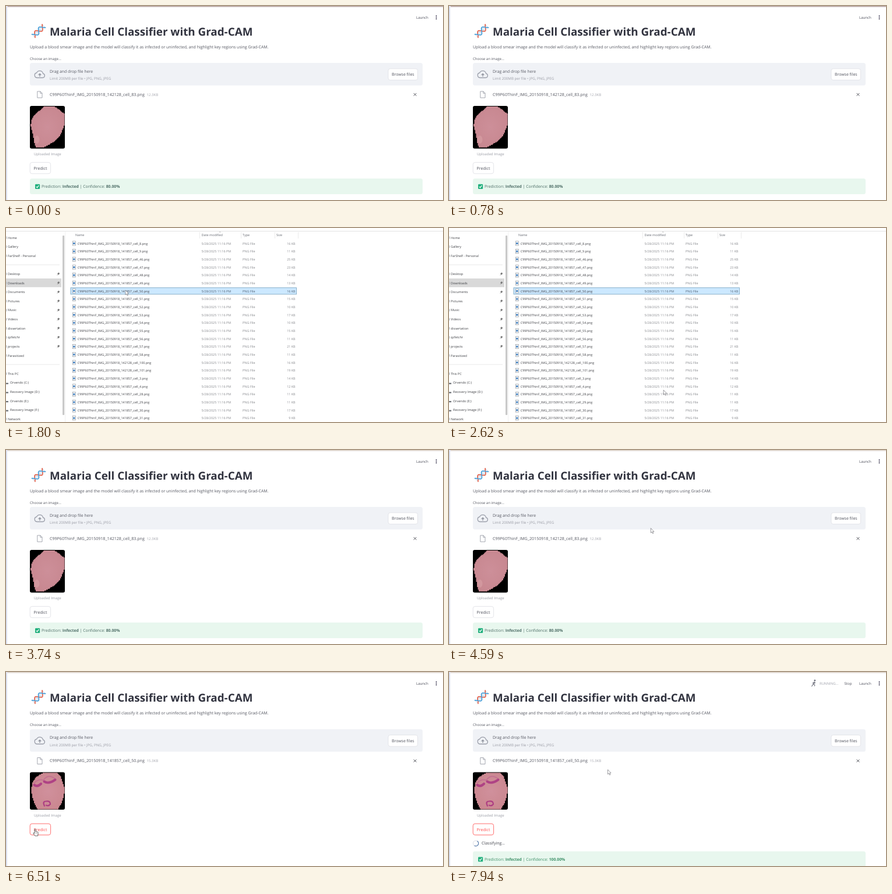
Animation, 750 px wide and 334 px high, one loop 7990 ms. Source, as an HTML page:

```html
<!DOCTYPE html>
<html lang="en">
<head>
<meta charset="utf-8">
<title>Malaria Cell Classifier</title>
<style>
  html, body { margin: 0; width: 100%; height: 100%; overflow: hidden; background: #fff; }
  svg { display: block; width: 750px; height: 334px; }
  text { font-family: "Open Sans", "Noto Sans", sans-serif; text-rendering: geometricPrecision; white-space: pre; }
</style>
</head>
<body>
<svg id="stage" viewBox="0 0 750 334" xmlns="http://www.w3.org/2000/svg"></svg>
<script>
const LOOP = 7990;
const INK = '#31333f', GREY = '#9a9ca5', RED = '#ff4b4b';

const text = (x, y, size, str, fill = INK, more = '') =>
  `<text x="${x}" y="${y}" font-size="${size}" fill="${fill}" ${more}>${str}</text>`;
const rect = (x, y, w, h, fill, more = '') =>
  `<rect x="${x}" y="${y}" width="${w}" height="${h}" fill="${fill}" ${more}/>`;
const path = (d, stroke, width = 1, more = '') =>
  `<path d="${d}" fill="none" stroke="${stroke}" stroke-width="${width}" ${more}/>`;
const shape = (d, fill, more = '') => `<path d="${d}" fill="${fill}" ${more}/>`;
const group = (id, content, more = '') => `<g id="${id}" ${more}>${content}</g>`;
const mix = (a, b, p) => a + (b - a) * p;

// ---- classifier page ----
function helix() {
  const wave = u => 4.2 * Math.sin(u * Math.PI / 9);
  const strand = side => {
    let d = '';
    for (let u = -13; u <= 13; u += 0.5) d += `${d ? 'L' : 'M'}${u} ${(side * wave(u)).toFixed(2)}`;
    return d;
  };
  let rungs = '';
  for (const u of [-12, -6, -4, -2.5, 2.5, 4, 6, 12]) rungs += `M${u} ${-wave(u)}V${wave(u)}`;
  return `<g transform="translate(56 43) rotate(-44)">${path(rungs, '#8fb4d4', 0.7)}
    ${path(strand(1), '#e4573f', 1.6)}${path(strand(-1), '#3f9bd8', 1.6)}</g>`;
}

// Blocky blob from a few [y, left, right] spans, snapped to a coarse grid.
function blob(spans, fill) {
  const STEP = 1.5, snap = v => Math.round(v / STEP) * STEP;
  let d = '';
  for (let y = spans[0][0]; y < spans[spans.length - 1][0]; y += STEP) {
    const i = spans.findIndex(span => span[0] > y);
    const [y0, l0, r0] = spans[i - 1], [y1, l1, r1] = spans[i];
    const p = (y - y0) / (y1 - y0);
    d += `M${snap(mix(l0, l1, p))} ${y}H${snap(mix(r0, r1, p))}V${y + STEP + 0.1}H${snap(mix(l0, l1, p))}Z`;
  }
  return shape(d, fill);
}

const plainCell = rect(41, 172, 60, 73.5, '#000', 'rx="3"') +
  blob([[173, 64, 84], [178, 59, 92], [185, 51, 100], [192, 45, 101], [205, 42, 100], [215, 45, 96],
    [225, 47, 91], [233, 48, 82], [240, 50, 70], [243.5, 53, 64]], 'url(#pink)') +
  '<ellipse cx="53" cy="230" rx="4.5" ry="7" fill="#dba6aa" opacity=".5"/>';

const stainedCell = rect(41, 172, 60, 64.5, '#000', 'rx="3"') +
  blob([[173, 63, 88], [179, 52, 94], [188, 46, 97], [201, 43, 101], [213, 45, 99], [225, 49, 95],
    [235.5, 54, 89]], 'url(#rose)') +
  `<g stroke-linecap="round">${path('M64 186Q72 174 84 183M49 190Q56 183 64 186', '#b8588f', 2, 'opacity=".45"')}
    ${path('M48.5 194Q54 198 60 192', '#a3237d', 4.2, 'opacity=".7"')}
    ${path('M65.5 188Q73 193 84.5 185', '#a3237d', 4, 'opacity=".7"')}
    ${path('M66 230Q62 222 69 222Q76 221 76 227Q73 231 69 229', '#a3237d', 2.2, 'opacity=".75"')}</g>`;

const heading = text(704, 21.6, 6.1, 'Launch', '#4a4c58') +
  [17, 19.6, 22.2].map(y => `<circle cx="738.5" cy="${y}" r=".95" fill="#3a3650"/>`).join('') +
  helix() +
  text(75, 50.5, 18.82, 'Malaria Cell Classifier with Grad-CAM', INK, 'font-weight="700"') +
  text(41, 73, 6.97, 'Upload a blood smear image and the model will classify it as infected or uninfected, and highlight key regions using Grad-CAM.', '#555761') +
  text(41, 92.6, 6.1, 'Choose an image...', '#555761');

const uploader = rect(41, 98, 674, 38.7, '#f0f2f6', 'rx="3.5"') +
  path('M53.5 123.5H63A3.6 3.6 0 0 0 63.6 116.4A5.8 5.8 0 0 0 52.6 115A4.3 4.3 0 0 0 53.5 123.5Z', '#9b9faa', 1.3) +
  path('M58 121.5V116.8M55.8 118.8L58 116.6L60.2 118.8', '#8d919c', 1.3) +
  text(75, 114.8, 6.87, 'Drag and drop file here', '#555761') +
  text(75, 127, 6.17, 'Limit 200MB per file • JPG, PNG, JPEG', GREY) +
  rect(656, 108, 50.5, 19.6, '#fff', 'rx="3.5" stroke="#dcdde2" stroke-width=".7"') +
  text(681.3, 120.2, 6.95, 'Browse files', '#50525d', 'text-anchor="middle"') +
  path('M53.8 147V158H62V150L59 147ZM58.8 147V150.3H62', '#9a9da8', 0.9) +
  text(75, 154.6, 7.1, '', '#555761', 'id="fileName"') +
  text(241.5, 154.6, 6.1, '', '#a3a5ad', 'id="fileSize"') +
  path('M699.6 150L704.4 154.8M704.4 150L699.6 154.8', '#44464f', 0.9);

const predict = text(71.3, 257, 6.1, 'Uploaded Image', GREY, 'text-anchor="middle"') +
  rect(41.2, 269.3, 35.4, 19.4, '#fff', 'id="button" rx="3.5" stroke-width=".8"') +
  text(58.9, 281.7, 7.1, 'Predict', INK, 'id="buttonLabel" text-anchor="middle"');

const result = rect(41, 297, 674, 27, '#e8f7ee', 'rx="3.5"') +
  rect(50, 306.7, 8.2, 8.2, '#22b07d', 'rx="1.2"') +
  path('M51.9 310.9L53.5 312.7L56.4 308.8', '#fff', 1.2) +
  text(61, 313.4, 6.82, 'Prediction: <tspan font-weight="700">Infected</tspan> | Confidence: <tspan font-weight="700" id="confidence"></tspan>', '', 'id="verdict"');

const report = '<circle cx="49" cy="335.5" r="5.2" fill="#2f9a78"/>' +
  text(63, 340, 11.3, 'Grad-CAM Visualization', INK, 'font-weight="700"');

const busy = group('runner', '<circle cx="627.8" cy="14.6" r="1.5" fill="#777984"/>' + path('', '#777984', 1.1, 'id="limbs"')) +
  text(636, 21.6, 6, 'RUNNING...', '#a0a2ab') +
  text(678.5, 21.6, 6.1, 'Stop', '#4a4c58') +
  '<circle cx="46" cy="295" r="4.6" fill="none" stroke="#dfe1e8" stroke-width="1.1"/>' +
  path('M46 290.4A4.6 4.6 0 0 0 41.4 295A4.6 4.6 0 0 0 46 299.6', '#4d74a8', 1.1, 'id="spinner"') +
  text(56, 297.4, 7, 'Classifying...', '#44464f');

const page = rect(0, 0, 750, 334, '#fff') + rect(0, 0, 2, 334, '#d9dff0') +
  rect(0, 0, 750, 2, '#e4e2ee') + rect(3, 0, 747, 1.5, '', 'id="topLine"') +
  heading +
  group('body', uploader + group('plain', plainCell) + group('stained', stainedCell) +
    group('predict', predict)) +
  group('result', result) + group('report', report) + group('busy', busy);

// ---- file browser ----
function fileRows() {
  const cells = [8, 9, 46, 47, 48, 49, 50, 51, 52, 53, 54, 55, 56, 57, 58, 100, 101, 3, 4, 28, 29, 30, 31];
  const sizes = [16, 11, 25, 23, 14, 13, 16, 15, 10, 17, 10, 15, 11, 21, 11, 16, 19, 14, 12, 11, 11, 17, 9];
  return cells.map((cell, i) => {
    const y = 26.6 + i * 13.67, base = y + 1.9;
    const time = cell >= 100 ? 142128 : 141857;
    const picked = cell === 50;
    const soft = picked ? '#4d5f70' : '#85878c';
    return (picked ? rect(111, y - 5.8, 387.5, 11.2, '#cce8ff', 'stroke="#7fa9c4" stroke-width=".9"') : '') +
      rect(114.3, y - 3.8, 5, 7.2, '#fff', 'stroke="#8d949c" stroke-width=".7"') +
      rect(115.3, y - 1.6, 3, 3, '#3f7fc0') +
      text(122.8, base, 5.38, `C99P60ThinF_IMG_20150918_${time}_cell_${cell}.png`, '#3c3d42') +
      text(335.5, base, 5.45, '5/28/2025 11:16 PM', soft) +
      text(406, base, 5.5, 'PNG File', soft) +
      text(496.5, base, 5.4, `${sizes[i]} KB`, soft, 'text-anchor="end"');
  }).join('');
}

function sidebar() {
  const items = ['Home', 'Gallery', 'FarShelf - Personal', '', 'Desktop', 'Downloads', 'Documents', 'Pictures',
    'Music', 'Videos', 'dissertation', 'qzfetchr', 'projects', 'Parasitized', '', 'This PC', 'Orvendo (C:)',
    'Recovery Image (D:)', 'Orvendo (E:)', 'Recovery Image (F:)', 'Network'];
  return items.map((name, i) => {
    const y = 16.6 + i * 15.61;
    if (!name) return rect(0, y - 0.5, 92, 0.7, '#dedede');
    const drive = i >= 16 && i <= 19, pinned = i >= 4 && i <= 12;
    return (name === 'Downloads' ? rect(0, y - 7.8, 95, 15, '#d9d9d9') : '') +
      (drive ? rect(0, y + 0.3, 4, 2.2, '#6c7076') : rect(0, y - 2, 1, 4, '#a9b4bf')) +
      text(drive ? 7 : 3, y + 2, 5.5, name, '#3f4045') +
      (pinned ? path(`M87.8 ${y + 2.4}L89.4 ${y + 0.8}`, '#777', 0.7) +
        shape(`M88 ${y - 0.6}L90.4 ${y - 2.6}L92.2 ${y - 0.8}L90.2 ${y + 1.8}Z`, '#777') : '');
  }).join('');
}

const columns = [[119, 'Name'], [335.5, 'Date modified'], [406, 'Type'], [464, 'Size']];
const browser = rect(0, 0, 750, 334, '#fff') + rect(0, 5.2, 750, 0.8, '#dcdcdc') +
  sidebar() + rect(97, 13, 3.2, 309, '#c9c9c9', 'rx="1"') + rect(101.5, 6, 0.6, 328, '#e6e6e6') +
  columns.map(([x, name]) => text(x, 14, 5.5, name, '#666a72')).join('') +
  [332.3, 403, 461, 501].map(x => rect(x, 7, 0.6, 11, '#dedede')).join('') +
  path('M365.8 7.6L367.2 6.4L368.6 7.6', '#888', 0.6) + fileRows();

// ---- pointers, drawn with their tip at 0,0 ----
const pointers =
  group('arrow', shape('M0 0V8L1.9 6.4L3.2 9.3L4.5 8.7L3.2 5.9H5.6Z', '#fff', 'stroke="#5c5c62" stroke-width=".6"')) +
  group('hand', shape('M-.9 .7Q0 -.6 .9 .7V4.2L4.6 5Q5.4 5.4 5.2 7L4.6 11.6H-.3L-3 7.6Q-3.4 6 -2 6.4L-.9 7.4Z',
    '#fff', 'stroke="#333" stroke-width=".75"') + path('M1.6 6V8M3.2 6.3V8', '#333', 0.4));

const gradient = (id, inner, outer) =>
  `<radialGradient id="${id}"><stop offset="0" stop-color="${inner}"/><stop offset="1" stop-color="${outer}"/></radialGradient>`;

document.getElementById('stage').innerHTML =
  `<defs>${gradient('pink', '#cd8f99', '#c88891')}${gradient('rose', '#d0909c', '#cb8891')}</defs>` +
  group('page', page) + group('browser', browser) + pointers;

const el = {};
document.querySelectorAll('#stage [id]').forEach(node => el[node.id] = node);
const show = (id, on) => el[id].setAttribute('display', on ? 'inline' : 'none');
const set = (id, name, value) => el[id].setAttribute(name, value);
const write = (id, str) => { if (el[id].textContent !== str) el[id].textContent = str; };

// ---- pointer movement: [time, x, y] ----
const tracks = [
  [[520, 556, 276], [780, 366, 336]],
  [[1400, 333, 278], [1800, 205, 107], [2190, 200, 104], [2230, 200, 104], [2810, 424, 337]],
  [[4000, 414, 329], [4680, 343, 125], [5870, 343, 125], [6360, 38, 273], [6510, 50, 270.5],
   [6980, 50, 270.5], [7940, 272.5, 168], [LOOP, 272.5, 168]]
];
const ease = p => p * p * (3 - 2 * p);

function pointerAt(t) {
  const track = tracks.find(k => t >= k[0][0] && t < k[k.length - 1][0]);
  if (!track) return null;
  const i = track.findIndex(key => key[0] > t);
  const [t0, x0, y0] = track[i - 1], [t1, x1, y1] = track[i];
  const p = ease((t - t0) / (t1 - t0));
  return { x: mix(x0, x1, p), y: mix(y0, y1, p) };
}

function render(t) {
  const swapped = t >= 5530, cleared = t >= 5570, running = t >= 6810, done = t >= 7560;
  const browsing = t >= 1140 && t < 3740;
  show('browser', browsing);
  set('browser', 'opacity', t < 1190 ? 0.6 : 1);

  set('topLine', 'fill', t < 3740 ? '#bfaaa4' : '#e3d9cc');
  write('fileName', `C99P60ThinF_IMG_20150918_${swapped ? '141857_cell_50' : '142128_cell_83'}.png`);
  write('fileSize', swapped ? '15.3KB' : '12.3KB');
  show('plain', !swapped);
  show('stained', swapped);
  set('body', 'transform', `translate(0 ${cleared ? 0.5 : 0})`);
  set('predict', 'transform', `translate(0 ${swapped ? -8.6 : 0})`);

  show('result', !cleared || done);
  set('result', 'transform', `translate(0 ${done ? 11.7 : swapped ? -8.8 : 0})`);
  write('confidence', done ? '100.00%' : '80.00%');
  set('verdict', 'fill', swapped ? '#3c8f66' : '#4d6d66');
  show('report', swapped && !cleared);

  show('busy', running);
  set('spinner', 'transform', `rotate(${t * 0.48 % 360} 46 295)`);
  const swing = 2.6 * Math.sin(t / 80);
  set('limbs', 'd', `M627 16.6L625.6 20.4L${626.4 + swing} 22.4L${625.4 + swing * 1.2} 25
    M625.6 20.4L${625.4 - swing} 22.4L${624 - swing * 1.2} 24.4
    M627 17.2L${627 + swing} 19L${629 + swing * 0.6} 19M627 17.2L${626 - swing} 18.6L${624.6 - swing * 0.6} 19.8`);

  const tip = pointerAt(t);
  const overButton = tip && !browsing && tip.x > 41 && tip.x < 77 && tip.y > 261 && tip.y < 281;
  const hot = overButton || t >= 6730;
  set('button', 'stroke', hot ? RED : '#dcdde2');
  set('buttonLabel', 'fill', hot ? RED : '#50525d');
  show('arrow', tip && !overButton);
  show('hand', overButton);
  if (tip) set(overButton ? 'hand' : 'arrow', 'transform', `translate(${tip.x} ${tip.y})`);
}

const start = performance.now();
function tick() {
  render((performance.now() - start) % LOOP);
  requestAnimationFrame(tick);
}
tick();
</script>
</body>
</html>
```
